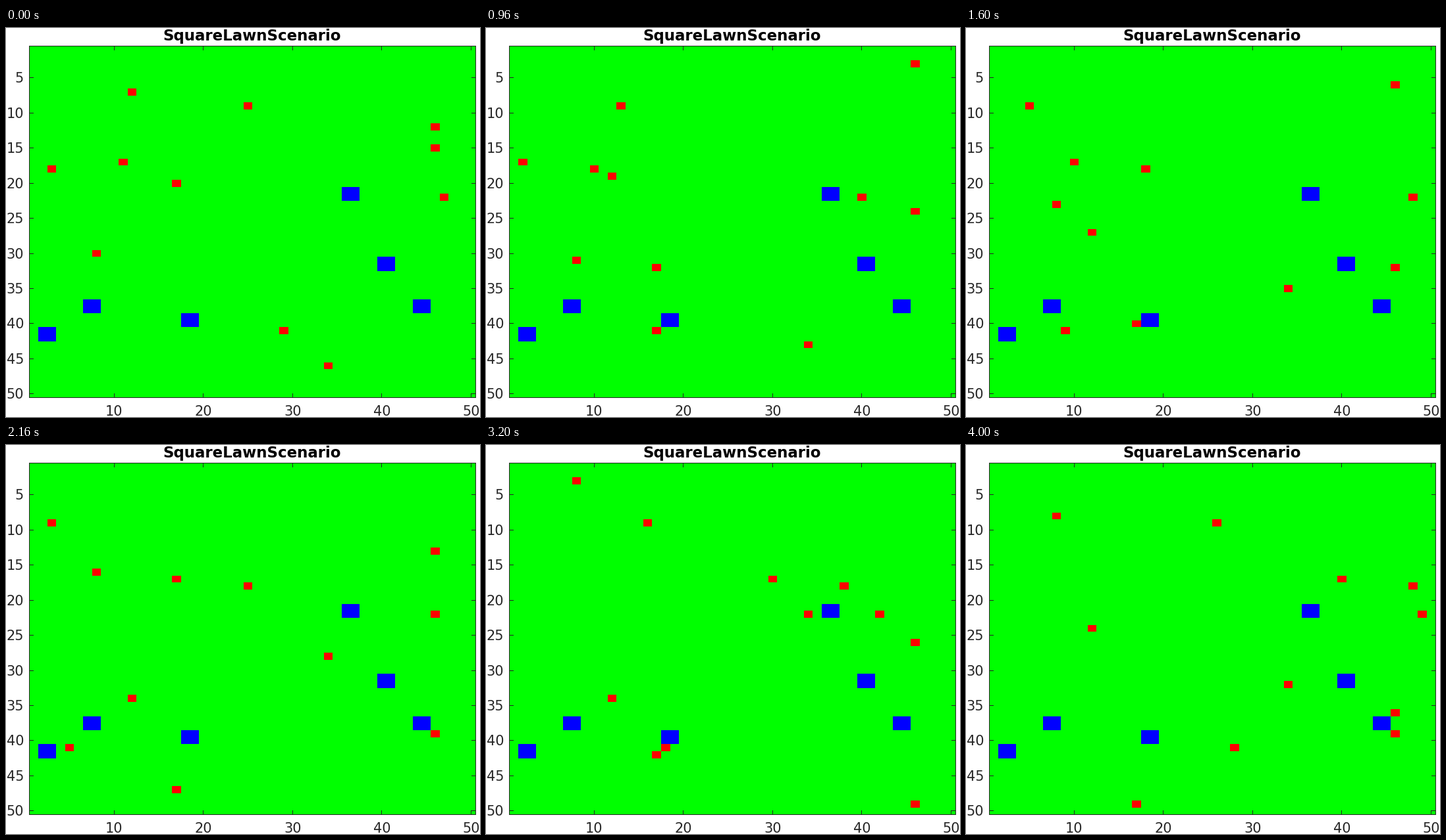
Animation of 720 by 592 pixels, one loop 4.08 s. Source, as a matplotlib script:

```python
import matplotlib.pyplot as plt
from matplotlib.animation import FuncAnimation
from matplotlib.patches import Rectangle

W, H, DPI = 720, 592, 100
FRAMES, STEP_MS = 51, 80
CELLS = 50
X0, Y0, CELL_W, CELL_H = 35.7, 27.72, 13.548, 10.69
INK = "#262626"

# top-left cells of the 2x2 ponds
PONDS = [(36, 21), (40, 31), (44, 37), (7, 37), (18, 39), (2, 41)]
# column, row and heading of each mower, in the order they take turns
MOWERS = [
    (17, 20, 0, 1), (29, 41, -1, 0), (12, 7, 0, 1), (34, 46, 0, 1),
    (3, 18, -1, 0), (11, 17, -1, 0), (25, 9, -1, 0), (47, 22, -1, 0),
    (46, 12, 0, 1), (46, 15, 0, -1), (8, 30, 0, 1),
]
WATER = {(c + i, r + j) for c, r in PONDS for i in (0, 1) for j in (0, 1)}


def cell_box(col, row, size=1):
    """Pixel bounds of a square block of cells."""
    left, right = (round(X0 + k * CELL_W) for k in (col - 1, col - 1 + size))
    top, bottom = (round(Y0 + k * CELL_H) for k in (row - 1, row - 1 + size))
    return left, top, right - left, bottom - top


def simulate():
    """Mowers go straight; a blocked one spends its turn reversing."""
    bots = [list(m) for m in MOWERS]
    history = []
    for _ in range(FRAMES):
        history.append([(b[0], b[1]) for b in bots])
        taken = set(history[-1])
        for b in bots:
            here, ahead = (b[0], b[1]), (b[0] + b[2], b[1] + b[3])
            inside = all(1 <= k <= CELLS for k in ahead)
            if inside and ahead not in WATER and ahead not in taken:
                taken.remove(here)
                taken.add(ahead)
                b[:2] = ahead
            else:
                b[2:] = -b[2], -b[3]
    return history


fig = plt.figure(figsize=(W / DPI, H / DPI), dpi=DPI, facecolor="white")
ax = fig.add_axes([0, 0, 1, 1])
ax.set(xlim=(0, W), ylim=(H, 0))
ax.axis("off")


def rect(x, y, w, h, color, z=1):
    return ax.add_patch(Rectangle((x, y), w, h, facecolor=color, linewidth=0,
                                  antialiased=False, zorder=z))


def label(x, y, text, px, ha="center", **style):
    ax.text(x, y, text, fontsize=px * 72 / DPI, family="DejaVu Sans",
            ha=ha, va="baseline", **style)


LEFT, TOP, RIGHT, BOTTOM = 35, 27, 713, 562
rect(LEFT, TOP, RIGHT - LEFT, BOTTOM - TOP, "#00ff00")
for col, row in PONDS:
    rect(*cell_box(col, row, 2), "#0000ff", 2)
dots = [rect(0, 0, 1, 1, "#ff0000", 3) for _ in MOWERS]

for y in (TOP, BOTTOM):
    rect(LEFT, y, RIGHT - LEFT + 1, 1, INK, 4)
for x in (LEFT, RIGHT):
    rect(x, TOP, 1, BOTTOM - TOP + 1, INK, 4)

TICK = 7
for col in range(10, CELLS + 1, 10):
    x = X0 + (col - 0.5) * CELL_W
    for y in (TOP, BOTTOM - TICK + 1):
        rect(int(x), y, 1, TICK, INK, 4)
    label(x, 590, str(col), 20.83, color=INK)
for row in range(5, CELLS + 1, 5):
    y = Y0 + (row - 0.5) * CELL_H
    for x in (LEFT, RIGHT - TICK + 1):
        rect(x, int(y), TICK, 1, INK, 4)
    label(27, int(y) + 8, str(row), 20.83, "right", color=INK)

label(374, 19, "SquareLawnScenario", 22.92, weight="bold", color="black")

PATHS = simulate()


def draw(frame):
    for dot, cell in zip(dots, PATHS[frame]):
        dot.set_bounds(*cell_box(*cell))
    return dots


anim = FuncAnimation(fig, draw, frames=FRAMES, interval=STEP_MS,
                     repeat=True, repeat_delay=0, blit=False)
plt.show()
```
